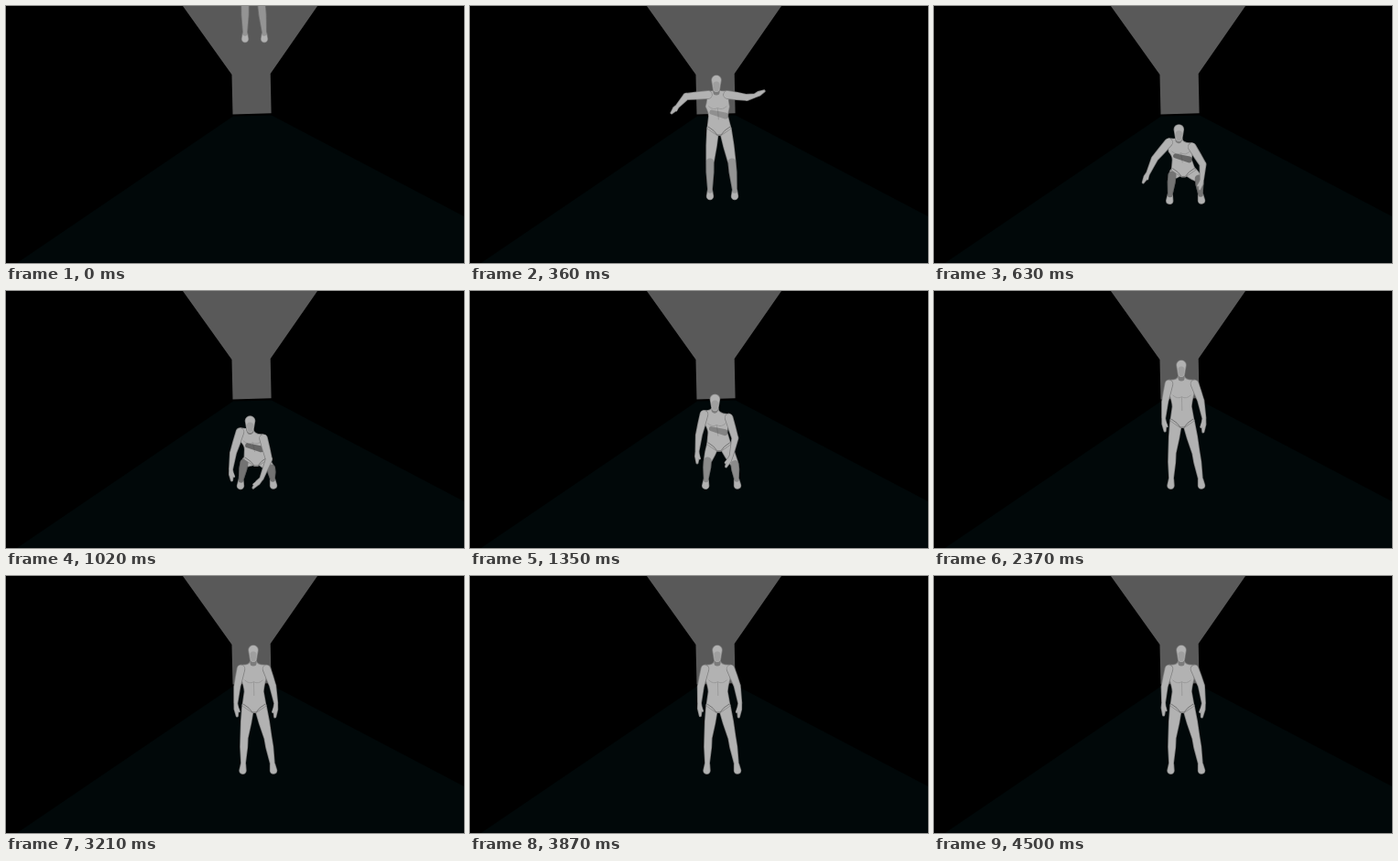
Recreate the animation shown at these times as an HTML page. Size 500 by 281 pixels, loop 4.53 s.

```html
<!DOCTYPE html>
<html lang="en">
<head>
<meta charset="utf-8">
<title>Landing</title>
<style>
  html, body { margin: 0; width: 100%; height: 100%; overflow: hidden; background: #000; }
  svg { display: block; width: 100vw; height: 100vh; }
</style>
</head>
<body>
<svg viewBox="0 0 500 281">
  <rect width="500" height="281" fill="#000"/>
  <path d="M248 120.5 L290 119.5 L500 230 V281 H12 Z" fill="#010809"/>
  <path d="M193 0 H340 L288.7 74 L289.6 117.3 L247.5 118.6 L246.5 75 Z" fill="#595959"/>
  <g id="body"></g>
</svg>
<script>
const LOOP = 4530, STEP = 30, LAND = 360, DROP = 172;
const EDGE = '#808080', SKIN = '#b2b2b2';

// Joints: s shoulder, e elbow, w wrist, t fingertip, k knee, a ankle, f foot; l/r = screen side.
const planted = { al: [259, 206], fl: [258.5, 212.7], ar: [291, 206], fr: [292, 212.7] };

const air = {
  head: [269, 85], neck: [269, 94], hip: [272, 132],
  sl: [260, 97], el: [236, 99], wl: [227, 109], tl: [220, 117],
  sr: [281, 97], er: [302, 100], wr: [311, 98], tr: [321, 93],
  kl: [262, 171], al: [262, 202], fl: [262, 208],
  kr: [286, 171], ar: [289, 202], fr: [289, 208]
};
const sink = {
  ...planted,
  head: [268, 126], neck: [268, 135], hip: [272, 167],
  sl: [257, 138], el: [237, 151], wl: [228, 164], tl: [220, 173],
  sr: [282, 141], er: [298, 156], wr: [302, 168], tr: [305, 178],
  kl: [260, 182], kr: [289, 184]
};
const crouch = {
  ...planted,
  head: [266.5, 146], neck: [266, 152], hip: [273, 182],
  sl: [255.5, 154], el: [248, 177], wl: [245.5, 195], tl: [246.5, 207],
  sr: [281, 161], er: [287, 184], wr: [279, 205], tr: [270, 215],
  kl: [260, 188], al: [256.5, 207], fl: [256, 213],
  kr: [289.5, 194]
};
const low = { ...crouch };
for (const j of ['head', 'neck', 'hip', 'sl', 'sr', 'el', 'er', 'wl', 'wr', 'tl', 'tr'])
  low[j] = [crouch[j][0], crouch[j][1] + 5];

const rise = {
  ...planted,
  head: [269, 95], neck: [269, 105], hip: [270.5, 148],
  sl: [255.5, 112.5], el: [252, 134], wl: [251, 151], tl: [250.5, 165],
  sr: [284.5, 112.5], er: [292, 133], wr: [293.5, 151], tr: [292, 165],
  kl: [258.5, 182], kr: [288, 182]
};
const stand = {
  ...planted,
  head: [270, 85], neck: [270, 95], hip: [271, 140],
  sl: [256.5, 101.5], el: [252, 121], wl: [250.5, 139], tl: [252, 153],
  sr: [284.5, 101.5], er: [291.5, 120], wr: [295, 139], tr: [294, 154],
  kl: [260, 177], kr: [286, 177]
};
const rest = { ...stand, wl: [251, 138], tl: [251, 152], wr: [294, 139], tr: [292, 154] };

const keys = [[LAND, air], [540, sink], [780, low], [1020, crouch],
              [1710, rise], [2130, stand], [3300, stand], [LOOP, rest]];

const slope = (i, j, c) =>
  (keys[i + 1][1][j][c] - keys[i][1][j][c]) / (keys[i + 1][0] - keys[i][0]);

// Monotone tangents keep planted feet still and avoid overshoot.
function tangent(i, j, c) {
  if (i === 0) return slope(0, j, c);
  if (i === keys.length - 1) return 0;
  const a = slope(i - 1, j, c), b = slope(i, j, c);
  return a * b > 0 ? 2 * a * b / (a + b) : 0;
}

function curve(t, i, j, c) {
  const [t0, p] = keys[i], [t1, q] = keys[i + 1];
  const h = t1 - t0, u = (t - t0) / h, v = 1 - u;
  return p[j][c] * v * v * (1 + 2 * u) + q[j][c] * u * u * (3 - 2 * u)
    + h * u * v * (v * tangent(i, j, c) - u * tangent(i + 1, j, c));
}

function pose(t) {
  const out = {};
  if (t < LAND) {
    const u = t / LAND, dy = -DROP * (1 - u * (0.7 + 0.3 * u));
    for (const j in air) out[j] = [air[j][0], air[j][1] + dy];
    for (const j of ['kr', 'ar', 'fr']) out[j][0] -= 7 * (1 - u);
    for (const j of ['kl', 'al', 'fl']) out[j][0] -= 1 - u;
    return out;
  }
  let i = 0;
  while (i < keys.length - 2 && t >= keys[i + 1][0]) i++;
  for (const j in air) out[j] = [curve(t, i, j, 0), curve(t, i, j, 1)];
  const sway = 0.4 * Math.sin((t - 2130) / 480) * clamp((t - 2130) / 300);
  for (const j of ['el', 'wl', 'tl']) out[j][0] += sway;
  for (const j of ['er', 'wr', 'tr']) out[j][0] -= sway;
  return out;
}

const clamp = v => Math.min(1, Math.max(0, v));
const n = v => v.toFixed(2);
const pt = (x, y) => n(x) + ' ' + n(y);
const mix = (a, b, u) => [a[0] + (b[0] - a[0]) * u, a[1] + (b[1] - a[1]) * u];
const off = (a, x, y) => [a[0] + x, a[1] + y];

// Tapered capsule between two joints.
function limb(a, b, ra, rb) {
  const dx = b[0] - a[0], dy = b[1] - a[1], d = Math.hypot(dx, dy) || 1;
  const x = -dy / d, y = dx / d;
  return `M${pt(a[0] + x * ra, a[1] + y * ra)}L${pt(b[0] + x * rb, b[1] + y * rb)}` +
    `A${n(rb)} ${n(rb)} 0 0 0 ${pt(b[0] - x * rb, b[1] - y * rb)}` +
    `L${pt(a[0] - x * ra, a[1] - y * ra)}A${n(ra)} ${n(ra)} 0 0 0 ${pt(a[0] + x * ra, a[1] + y * ra)}Z`;
}

// Each shape takes the pose and an inset, used for the lit inner area.
const shin = s => (p, k) => {
  const knee = p['k' + s], ankle = p['a' + s], calf = mix(knee, ankle, 0.35);
  return limb(knee, calf, 4.6 - k, 4.5 - k) + limb(calf, ankle, 4.5 - k, 2.8 - k);
};

const leg = s => (p, k) => {
  const dir = s === 'l' ? -1 : 1, knee = p['k' + s];
  const top = off(p.hip, 6.8 * dir, 3), thigh = mix(top, knee, 0.5);
  return limb(top, thigh, 7 - k, 6.2 - k) + limb(thigh, knee, 6.2 - k, 4.6 - k) +
    shin(s)(p, k) + limb(p['a' + s], p['f' + s], 3.2 - k, 4.2 - k);
};

const arm = s => (p, k) => {
  const sh = p['s' + s], el = p['e' + s], w = p['w' + s], t = p['t' + s];
  const palm = mix(w, t, 0.45), dir = s === 'l' ? 1 : -1;
  return limb(sh, mix(sh, el, 0.5), 4.8 - k, 4.5 - k) +
    limb(mix(sh, el, 0.5), el, 4.5 - k, 3.9 - k) +
    limb(el, w, 4 - k, 2.5 - k) +
    limb(w, palm, 2.4 - k, 3 - k) + limb(palm, t, 3 - k, 1.6 - k) +
    limb(w, off(mix(w, t, 0.65), 2.8 * dir, 0), 1.6 - k * 0.6, 1.2 - k * 0.6);
};

function torso(p, k) {
  const { neck, hip, sl, sr } = p;
  const waist = mix(neck, hip, 0.7), ribs = mix(neck, hip, 0.42);
  return `M${pt(neck[0] - 4 + k, neck[1] - 2)}` +
    `Q${pt(neck[0] - 5 + k, sl[1] - 4 + k)} ${pt(sl[0] + k, sl[1] - 4.8 + k)}` +
    `L${pt(sl[0] - 2 + k, sl[1] + 3)}` +
    `Q${pt(sl[0] - 1 + k, sl[1] + 5)} ${pt(ribs[0] - 13.5 + k, ribs[1])}` +
    `Q${pt(waist[0] - 11 + k, waist[1] - 4)} ${pt(waist[0] - 11 + k, waist[1])}` +
    `L${pt(hip[0] - 13.5 + k, hip[1] + 2)}L${pt(hip[0] - 2, hip[1] + 10 - k)}` +
    `L${pt(hip[0] + 2, hip[1] + 10 - k)}L${pt(hip[0] + 13.5 - k, hip[1] + 2)}` +
    `L${pt(waist[0] + 11 - k, waist[1])}` +
    `Q${pt(waist[0] + 11 - k, waist[1] - 4)} ${pt(ribs[0] + 13.5 - k, ribs[1])}` +
    `Q${pt(sr[0] + 1 - k, sr[1] + 5)} ${pt(sr[0] + 2 - k, sr[1] + 3)}` +
    `L${pt(sr[0] - k, sr[1] - 4.8 + k)}` +
    `Q${pt(neck[0] + 5 - k, sr[1] - 4 + k)} ${pt(neck[0] + 4 - k, neck[1] - 2)}Z`;
}

function creases(p) {
  const { neck, hip } = p, chest = mix(neck, hip, 0.46), belly = mix(neck, hip, 0.8);
  return `M${pt(chest[0] - 10, chest[1] - 2)}Q${pt(chest[0] - 5, chest[1] + 3)} ${pt(...chest)}` +
    `Q${pt(chest[0] + 5, chest[1] + 3)} ${pt(chest[0] + 10, chest[1] - 2)}` +
    `M${pt(...chest)}L${pt(...belly)}`;
}

const groin = ({ hip }) =>
  `M${pt(hip[0] - 12, hip[1])}Q${pt(hip[0] - 5, hip[1] + 4)} ${pt(hip[0] - 2, hip[1] + 9)}` +
  `H${n(hip[0] + 2)}Q${pt(hip[0] + 5, hip[1] + 4)} ${pt(hip[0] + 12, hip[1])}`;

const belly = ({ neck, hip }) => {
  const m = mix(neck, hip, 0.66);
  return limb(off(m, -7, -3), off(m, 8, 1), 2.5, 3.5);
};
const throat = p => limb(off(p.head, 0, 7), p.neck, 3.8, 3.6);
const head = (p, k) => limb(off(p.head, 0, -4), off(p.head, 0, 5.6), 5.8 - k, 4.2 - k);
const face = p => limb(off(p.head, 0, 1), off(p.head, 0, 5.5), 3.6, 2.7);

// How far the trunk folds forward, from 0 upright to 1.
const lean = p => clamp((44 - Math.hypot(p.hip[0] - p.neck[0], p.hip[1] - p.neck[1])) / 13);

const parts = [];
const body = document.getElementById('body');
function add(draw, attrs, inset = 0) {
  const el = document.createElementNS('http://www.w3.org/2000/svg', 'path');
  for (const a in attrs) el.setAttribute(a, attrs[a]);
  body.appendChild(el);
  parts.push(p => el.setAttribute('d', draw(p, inset)));
  return el;
}
function solid(draw) {
  add(draw, { fill: EDGE });
  add(draw, { fill: SKIN }, 0.8);
}
function shade(draw, strength) {
  const el = add(draw, { fill: '#333' });
  parts.push(p => el.setAttribute('opacity', n(strength * lean(p))));
}
const line = (draw, stroke, width) => add(draw, { fill: 'none', stroke, 'stroke-width': width });

for (const s of ['l', 'r']) {
  solid(leg(s));
  shade(shin(s), 0.5);
}
solid(torso);
line(creases, '#989898', 0.9);
line(groin, '#6c6c6c', 0.9);
shade(belly, 0.6);
solid(arm('l'));
solid(arm('r'));
add(throat, { fill: '#7c7c7c' });
solid(head);
add(face, { fill: '#8c8c8c', opacity: 0.5 });

function render(t) {
  const p = pose(Math.floor(t / STEP) * STEP);
  for (const part of parts) part(p);
}

const start = performance.now();
function tick() {
  render((performance.now() - start) % LOOP);
  requestAnimationFrame(tick);
}
tick();
</script>
</body>
</html>
```
